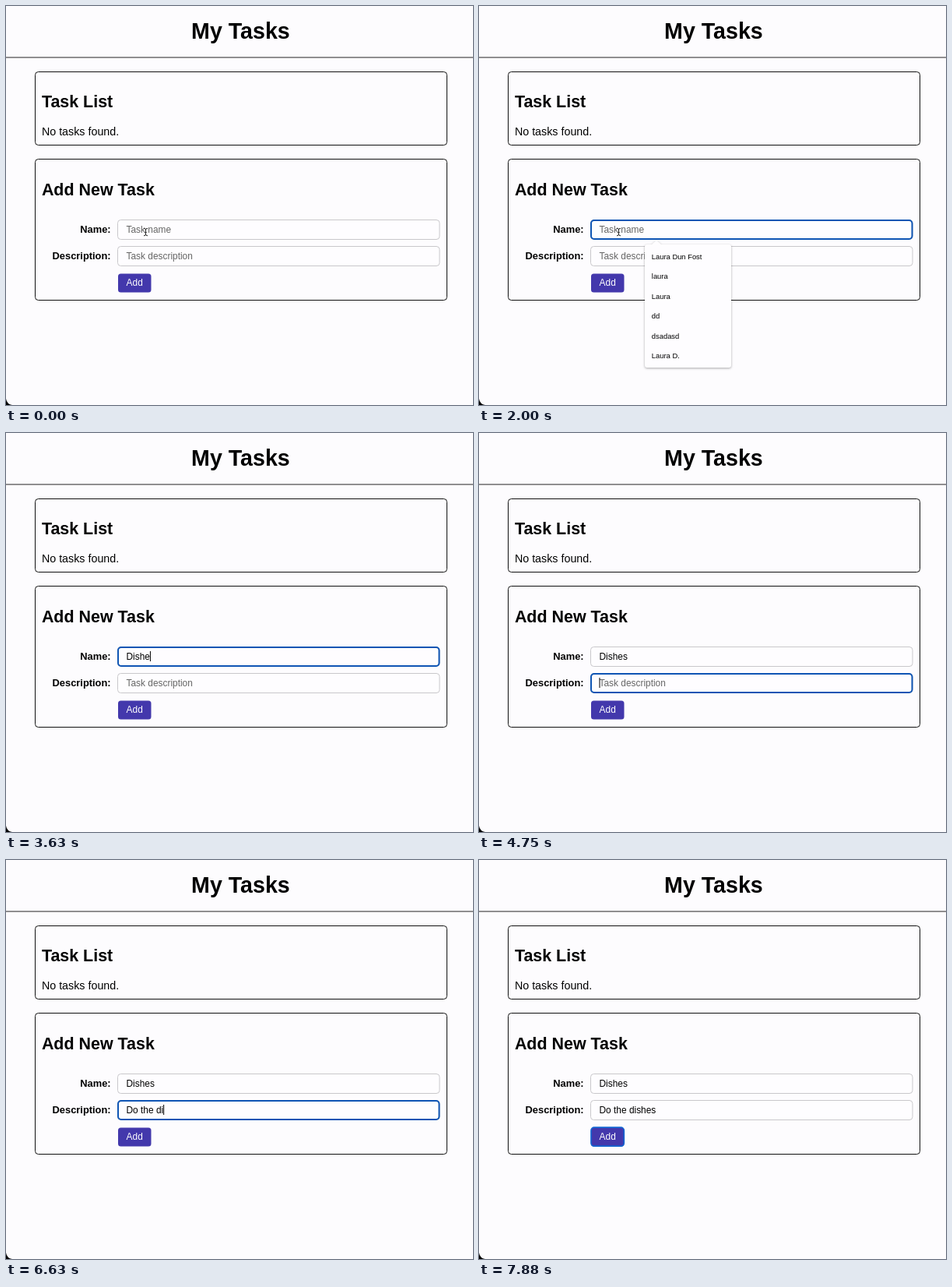
An HTML page for the animation above (8 s loop, 600 by 512 pixels).

```html
<!DOCTYPE html>
<html lang="en">
<head>
<meta charset="utf-8">
<title>My Tasks</title>
<style>
  html, body { margin: 0; width: 100%; height: 100%; overflow: hidden; background: #fdfcfe; }
  svg { display: block; font: 11.92px "Liberation Sans", Arial, sans-serif; }
  text { white-space: pre; }
  .h1 { font-size: 28.6px; font-weight: bold; text-anchor: middle; }
  .h2 { font-size: 21.45px; font-weight: bold; }
  .body { font-size: 14.3px; }
  .label { font-size: 12.87px; font-weight: bold; text-anchor: end; }
  .card { fill: none; stroke: #111; }
  .field { fill: #fefdff; stroke: #c9c8cb; }
  .focus { fill: none; stroke: #0f55b4; stroke-width: 2; }
  #menu { font-size: 9.4px; filter: drop-shadow(0 1px 1.5px #0005); }
</style>
</head>
<body>
<svg width="600" height="512" viewBox="0 0 600 512">
  <path d="M0 504Q1 511 8 512H0Z"/>
  <text class="h1" x="301.4" y="42">My Tasks</text>
  <path d="M0 66H600" stroke="#222"/>
  <rect class="card" x="37.5" y="84.5" width="529" height="94" rx="4"/>
  <text class="h2" x="45.9" y="130.3">Task List</text>
  <text class="body" x="45.9" y="165.5">No tasks found.</text>
  <rect class="card" x="37.5" y="196.5" width="529" height="181" rx="4"/>
  <text class="h2" x="45.9" y="242.7">Add New Task</text>
  <text class="label" x="134.6" y="291">Name:</text>
  <text class="label" x="134.6" y="325.3">Description:</text>
  <rect class="field" x="143.5" y="274.5" width="413.5" height="25" rx="4"/>
  <rect class="field" x="143.5" y="308.5" width="413.5" height="25" rx="4"/>
  <text id="name" x="154.5" y="290.8"></text>
  <text id="desc" x="154.5" y="325"></text>
  <rect x="144" y="343.5" width="42.5" height="24" rx="3.5" fill="#4338ac"/>
  <text x="165.2" y="359.2" text-anchor="middle" fill="#fff">Add</text>
  <rect id="ring" class="focus" rx="4"/>
  <rect id="caret" width="1" height="13"/>
  <g id="menu">
    <path d="M216 306H222L228 300.5L234 306H321Q324 306 324 309V461Q324 464 321 464H216Q213 464 213 461V309Q213 306 216 306Z" fill="#fefdff"/>
  </g>
  <g id="mouse" fill="none">
    <path d="M177 285.3Q179.5 285.3 179.5 287V293Q179.5 294.8 177 294.8M182 285.3Q179.5 285.3 179.5 287V293Q179.5 294.8 182 294.8" stroke="#fff" stroke-width="2.2"/>
    <path d="M177 285.3Q179.5 285.3 179.5 287V293Q179.5 294.8 177 294.8M182 285.3Q179.5 285.3 179.5 287V293Q179.5 294.8 182 294.8M178.3 290.5H180.7" stroke="#222"/>
  </g>
</svg>
<script>
const LOOP = 8000, CLICK = 130, TAB = 4750, SUBMIT = 7880;
const fields = [
  { id: "name", hint: "Task name", value: "Dishes", start: CLICK, end: TAB,
    keys: [2880, 3000, 3250, 3380, 3630, 4000], y: 275 },
  { id: "desc", hint: "Task description", value: "Do the dishes", start: TAB, end: SUBMIT,
    keys: [5000, 5250, 5380, 5880, 6000, 6130, 6250, 6500, 6630, 6750, 7000, 7250, 7380], y: 309 }
];
const $ = id => document.getElementById(id);
const show = (id, on) => $(id).setAttribute("visibility", on ? "visible" : "hidden");
const set = (id, attrs) => {
  for (const key in attrs) $(id).setAttribute(key, attrs[key]);
};
const pen = document.createElement("canvas").getContext("2d");
pen.font = '11.92px "Liberation Sans", Arial, sans-serif';

["Laura Dun Fost", "laura", "Laura", "dd", "dsadasd", "Laura D."].forEach((word, i) => {
  const item = document.createElementNS("http://www.w3.org/2000/svg", "text");
  item.textContent = word;
  item.setAttribute("x", 221.8);
  item.setAttribute("y", 325 + i * 25.4);
  $("menu").append(item);
});

function draw(t) {
  let caret = false;
  for (const f of fields) {
    const count = f.keys.filter(k => k <= t).length;
    const typed = f.value.slice(0, count);
    $(f.id).textContent = typed || f.hint;
    set(f.id, { fill: typed ? "#000" : "#666" });
    if (t < f.start || t >= f.end) continue;
    set("ring", { x: 144, y: f.y, width: 412.5, height: 24 });
    set("caret", { x: 154.5 + pen.measureText(typed).width, y: f.y + 5 });
    // The blink restarts with every key press
    const since = t - (count ? f.keys[count - 1] : f.start);
    caret = since % 1000 < 500;
  }
  const done = t >= SUBMIT;
  if (done) set("ring", { x: 144, y: 343.2, width: 42.3, height: 24 });
  set("ring", { style: done ? "stroke:#1264d2;stroke-width:1.7" : "" });
  show("ring", t >= CLICK);
  show("caret", caret);
  const idle = t < fields[0].keys[0];
  show("menu", t >= CLICK && idle);
  show("mouse", idle);
}

const begin = performance.now();
function tick() {
  draw((performance.now() - begin) % LOOP);
  requestAnimationFrame(tick);
}
tick();
</script>
</body>
</html>
```
